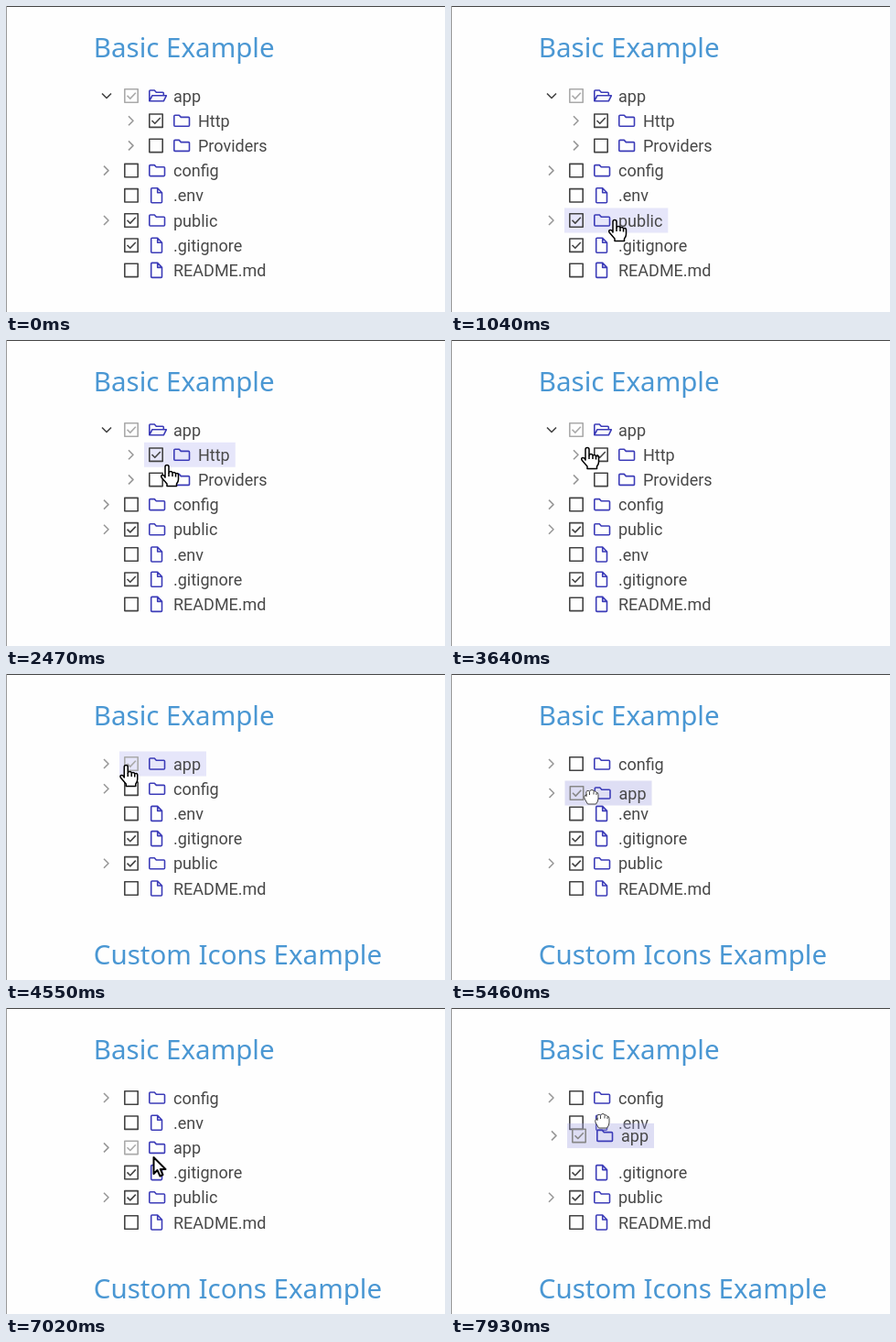
Animation, 480 px wide and 334 px high, one loop 8 s. Source, as an HTML page:

```html
<!DOCTYPE html>
<html lang="en">
<head>
<meta charset="utf-8">
<title>Sortable tree</title>
<style>
html, body { margin: 0; width: 100%; height: 100%; overflow: hidden; background: #fefefe; }
svg { display: block; width: 100vw; height: 100vh; }
.title { font: 29.5px "Noto Sans", sans-serif; fill: #4a97d3; }
.label { font: 18px Roboto, sans-serif; fill: #484848; }
.line { fill: none; stroke-width: 1.6; stroke-linejoin: round; }
.blue { stroke: #3c3cb8; }
.cursor { fill: #fff; stroke: #000; stroke-width: 1.5; stroke-linejoin: round; }
#fist { stroke: #444; stroke-width: 1; }
#arrow { stroke-width: 2; }
</style>
</head>
<body>
<svg viewBox="0 0 480 334">
  <rect width="480" height="334" fill="#fefefe"/>
  <text class="title" x="95.8" y="56">Basic Example</text>
  <text class="title" id="second" x="95.8">Custom Icons Example</text>
  <g id="tree"></g>
  <g id="hand" class="cursor">
    <path d="M-2 13V1.5Q-2-.5 0-.5T2 1.500V8Q2 6.500 4 6.500T6 8.500Q6 7.500 7.700 7.500T9.500 9.500Q9.500 8.500 11 8.500T12.500 10.500V15Q12.500 18 10.500 20V22.500H0V20L-6 13Q-7 11-5 10.500T-2 13Z"/>
    <path d="M2 8v4M6 9v3M9.500 10v2.500" fill="none"/>
  </g>
  <g id="fist" class="cursor">
    <path d="M-5-3Q-6-6-4-6.500T-1.500-5.500Q-1-7.500 1-7.500T3-6Q5-7 6-4.500Q8-5 8-2.500V2Q8 5 5.500 8H-3.500L-7 2Q-8-2-5-1.500Z"/>
    <path d="M-5-3v3M-1.500-5v3M3-5.500v3M6-4v2" fill="none"/>
  </g>
  <path id="arrow" class="cursor" d="M0 0V18L4 14L7 20.500L10 19L7.300 13H13Z"/>
  <path d="M0 .5H480" stroke="#444"/>
  <path d="M.5 0V334" stroke="#999"/>
</svg>
<script>
const LOOP = 8000, STEP = 130, TOP = 98, ROW = 27.2, COLLAPSE = 4160;
const FOLDER = 'M157.800-6h4.500l2 2.200h8.200q1 0 1 1v7.800q0 1-1 1h-14.700q-1 0-1-1v-10q0-1 1-1z';
const OPEN = 'M156.800 5.800V-5q0-1 1-1h4.500l2 2.200h7q1 0 1 1v2.300M156.800 5.800l3-6h15.500l-3 6z';
const FILE = 'M159.700-8h6l4.800 5v10q0 1-1 1h-9.800q-1 0-1-1V-7q0-1 1-1zM165.700-8v5h4.800';
const RIGHT = 'M107-5l5 5-5 5', DOWN = 'M105-2.500l5 5 5-5';

const $ = id => document.getElementById(id);

function add(parent, tag, attrs) {
  const el = document.createElementNS('http://www.w3.org/2000/svg', tag);
  for (const k in attrs) el.setAttribute(k, attrs[k]);
  return parent.appendChild(el);
}

const folders = ['app', 'Http', 'Providers', 'config', 'public'];
const checked = ['app', 'Http', 'public', '.gitignore'];
const nested = ['Http', 'Providers'];
const files = ['app', 'Http', 'Providers', 'config', '.env', 'public', '.gitignore', 'README.md'];

const rows = files.map(name => {
  const g = add($('tree'), 'g', {}), folder = folders.includes(name);
  const row = { name, g, indent: nested.includes(name) ? 27 : 0 };
  row.back = add(g, 'rect', { x: 124, y: -13.5, height: 27 });
  if (folder) row.chevron = add(g, 'path', { class: 'line', d: RIGHT, stroke: '#999' });
  row.check = add(g, 'g', { class: 'line', stroke: '#444' });
  add(row.check, 'rect', { x: 129.8, y: -7.2, width: 14.4, height: 14.4 });
  if (checked.includes(name)) add(row.check, 'path', { d: 'M132.500-.2l3.300 3.300 6-6.300' });
  row.icon = add(g, 'path', { class: 'line blue', d: folder ? FOLDER : FILE });
  row.text = add(g, 'text', { class: 'label', x: 183, y: 6.5 });
  row.text.textContent = name;
  return row;
});

// time, x, y
const path = [
  [390, 222, 326], [1040, 179, 234], [1300, 179, 234], [2080, 178, 206], [2470, 176, 137],
  [3640, 149, 118], [COLLAPSE, 110, 98], [4940, 152.5, 102], [5460, 153, 134],
  [7020, 161.5, 163], [7800, 162, 136], [7930, 165, 123]
];
const drags = [
  { name: 'public', from: 1300, to: 2080 },
  { name: 'app', from: 4940, to: 6890 },
  { name: 'app', from: 7800, to: LOOP }
];

function pointer(t) {
  const i = Math.max(1, path.findIndex(k => k[0] > t));
  const [a, b] = t >= path.at(-1)[0] ? path.slice(-2) : [path[i - 1], path[i]];
  const p = Math.max(0, Math.min(1, (t - a[0]) / (b[0] - a[0])));
  return [1, 2].map(n => a[n] + (b[n] - a[n]) * p);
}

// A held row moves with the pointer from the slot where it was grabbed.
function held({ name, from }, t) {
  const [x0, y0] = pointer(from), [x, y] = pointer(t);
  return [x - x0, TOP + ROW * order(from - 1).indexOf(name) + y - y0];
}

// Every drag so far puts its row into the nearest slot.
function order(t) {
  let list = t < COLLAPSE ? files : files.filter(n => !nested.includes(n));
  for (const d of drags.filter(d => d.from <= t)) {
    const slot = Math.round((held(d, Math.min(t, d.to))[1] - TOP) / ROW);
    list = list.filter(n => n !== d.name);
    list.splice(slot, 0, d.name);
  }
  return list;
}

function place(el, x, y, shown) {
  el.setAttribute('transform', `translate(${x} ${y})`);
  el.style.display = shown ? '' : 'none';
}

function draw(time) {
  const t = Math.floor(time / STEP) * STEP;
  const now = order(t), old = order(t - STEP);
  const [x, y] = pointer(t);
  const drag = drags.find(d => t >= d.from && t < d.to);
  const arrow = t >= 6890 && t < 7280;
  const pointing = t >= 390 && !drag && !arrow;

  for (const r of rows) {
    const to = now.indexOf(r.name), from = old.indexOf(r.name);
    const inHand = drag?.name === r.name;
    const [dx, cy] = inHand ? held(drag, t) : [0, TOP + ROW * (to < 0 ? from : (from + to) / 2)];
    const left = r.indent + dx, width = 65 + r.text.getComputedTextLength();
    const over = pointing && to >= 0 && Math.abs(y - cy) < 13.5 && x > 124 + left && x < 124 + left + width;
    place(r.g, left, cy, to >= 0 || from >= 0);
    r.g.style.opacity = to < 0 ? .5 : 1;
    r.back.setAttribute('width', width);
    r.back.setAttribute('fill', inHand ? 'rgba(161,161,224,.35)' : over ? '#e6e6fa' : 'none');
    if (inHand && r.g.nextSibling) $('tree').append(r.g);
    if (r.name === 'app') {
      const open = t < COLLAPSE;
      r.chevron.setAttribute('d', open ? DOWN : RIGHT);
      r.chevron.setAttribute('stroke', open ? '#444' : '#999');
      r.icon.setAttribute('d', open ? OPEN : FOLDER);
      r.check.setAttribute('stroke', inHand ? '#888' : '#aaa');
    }
  }

  $('second').setAttribute('y', 154 + ROW * (old.length + now.length) / 2);
  place($('hand'), x, y, pointing);
  place($('fist'), x, y, drag);
  place($('arrow'), x, y, arrow);
}

const start = performance.now();
function tick() {
  draw((performance.now() - start) % LOOP);
  requestAnimationFrame(tick);
}
tick();
</script>
</body>
</html>
```
